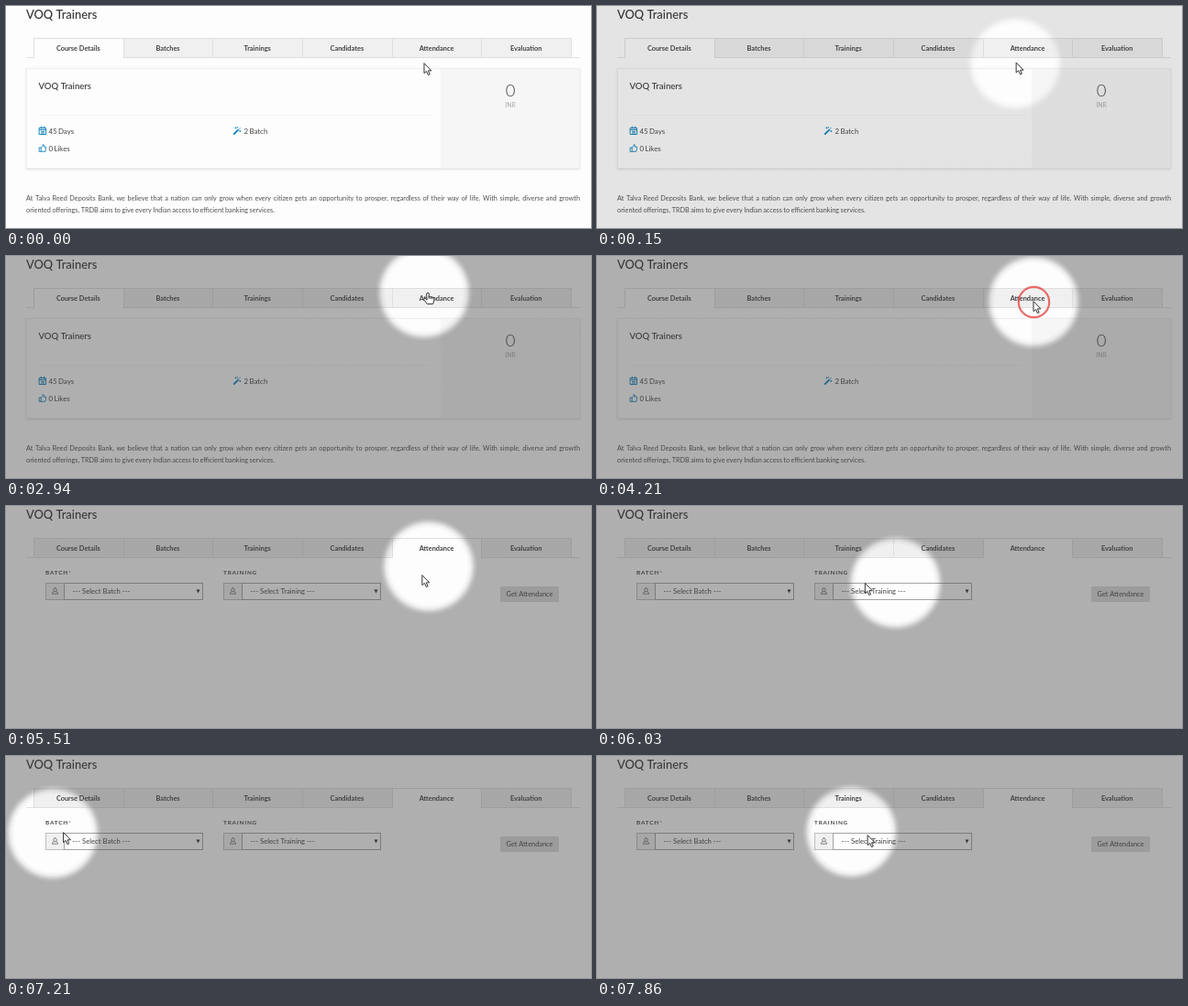
Recreate the animation shown at these times as an HTML page with a canvas. Size 638 by 243 pixels, loop 7990 ms.

```html
<!DOCTYPE html>
<html lang="en">
<head>
<meta charset="utf-8">
<title>Course attendance</title>
<style>
html, body { margin: 0; width: 100%; height: 100%; overflow: hidden; background: #fdfdfd; }
canvas { display: block; width: 638px; height: 243px; }
</style>
</head>
<body>
<canvas id="stage"></canvas>
<script>
const W = 638, H = 243, LOOP = 7990;
const SWITCH = 4580, CLICK = 4150, CLICK_END = 4440, LAG = 100;
const FONT = 'Lato, "Open Sans", sans-serif';
const BLUE = '#1585bd';
const TABS = ['Course Details', 'Batches', 'Trainings', 'Candidates', 'Attendance', 'Evaluation'];

// Pointer path: time, x, y
const PATH = [
  [0, 456, 63], [700, 470, 54], [1030, 477, 48], [1280, 469, 48],
  [1900, 448, 42], [2350, 442, 39], [2840, 456, 40], [2940, 460, 40],
  [3090, 467, 43], [3600, 490, 49], [4000, 476, 50], [5080, 476, 50],
  [5410, 461, 66], [5510, 454, 76], [6080, 279, 85], [6480, 196, 85],
  [6580, 167, 86], [6850, 46, 86], [7050, 48, 85], [7240, 67, 84],
  [7500, 165, 84], [7760, 277, 83], [7860, 295, 87], [7990, 304, 88]
];

const canvas = document.getElementById('stage');
const ctx = canvas.getContext('2d');
const dpr = window.devicePixelRatio || 1;
canvas.width = W * dpr;
canvas.height = H * dpr;

const clamp = v => Math.max(0, Math.min(1, v));

// Slope at a key; flat at turning points so the curve never overshoots
function slope(i, axis) {
  const a = PATH[i - 1], b = PATH[i], c = PATH[i + 1];
  if (!a || !c) return 0;
  const left = (b[axis] - a[axis]) / (b[0] - a[0]);
  const right = (c[axis] - b[axis]) / (c[0] - b[0]);
  return left * right <= 0 ? 0 : 2 * left * right / (left + right);
}

function pointer(t) {
  t = Math.max(0, t);
  let i = 0;
  while (i < PATH.length - 2 && t >= PATH[i + 1][0]) i++;
  const a = PATH[i], b = PATH[i + 1], span = b[0] - a[0];
  const u = clamp((t - a[0]) / span), v = 1 - u;
  return [1, 2].map(k =>
    a[k] * (1 + 2 * u) * v * v + b[k] * u * u * (3 - 2 * u) +
    span * u * v * (slope(i, k) * v - slope(i + 1, k) * u));
}

function text(str, x, y, size, { weight = 400, color = '#333', align = 'left', spacing = 0, gap = 0 } = {}) {
  ctx.font = `${weight} ${size}px ${FONT}`;
  ctx.fillStyle = color;
  ctx.textAlign = align;
  ctx.letterSpacing = spacing + 'px';
  ctx.wordSpacing = gap + 'px';
  ctx.fillText(str, x, y);
  ctx.letterSpacing = ctx.wordSpacing = '0px';
}

function justified(str, x, y, width, size, opts) {
  ctx.font = `400 ${size}px ${FONT}`;
  const gap = (width - ctx.measureText(str).width) / (str.split(' ').length - 1);
  text(str, x, y, size, { ...opts, gap });
}

function rect(x, y, w, h, fill, stroke) {
  if (fill) { ctx.fillStyle = fill; ctx.fillRect(x, y, w, h); }
  if (stroke) { ctx.strokeStyle = stroke; ctx.lineWidth = 1; ctx.strokeRect(x + .5, y + .5, w - 1, h - 1); }
}

function path(d, x, y, { fill, stroke, width = 1 }) {
  ctx.save();
  ctx.translate(x, y);
  const p = new Path2D(d);
  ctx.lineJoin = ctx.lineCap = 'round';
  ctx.lineWidth = width;
  if (fill) { ctx.fillStyle = fill; ctx.fill(p); }
  if (stroke) { ctx.strokeStyle = stroke; ctx.stroke(p); }
  ctx.restore();
}

function drawTabs(active) {
  const w = 586 / TABS.length;
  rect(22, 56, 604, 1, '#dfdfdf');
  TABS.forEach((name, i) => {
    const x = Math.round(30 + i * w), end = Math.round(30 + (i + 1) * w) + 1;
    const on = i === active;
    rect(x, 35, end - x, 22, on ? '#fdfdfd' : '#f0f0f0', '#dfdfdf');
    if (on) rect(x + 1, 56, end - x - 2, 1, '#fdfdfd');
  });
  TABS.forEach((name, i) =>
    text(name, 30 + (i + .5) * w, 48.5, 7.4, { weight: 700, color: '#404040', align: 'center' }));
}

function drawDetails() {
  ctx.save();
  ctx.shadowColor = 'rgba(0,0,0,.12)';
  ctx.shadowBlur = 2 * dpr;
  ctx.shadowOffsetY = dpr;
  rect(22, 68, 604, 110, '#fdfdfd');
  ctx.restore();
  rect(22, 68, 604, 110, null, '#eeeeee');
  rect(474, 69, 151, 108, '#f6f6f6');
  rect(36, 119, 427, 1, '#f3f3f3');
  text('VOQ Trainers', 35.5, 91, 9.6, { weight: 500 });
  text('0', 550, 99, 18.5, { weight: 300, color: '#444', align: 'center' });
  text('INR', 550, 111, 6.8, { color: '#aaa', align: 'center' });

  // Calendar, wand, thumb
  path('M.5 1.5H7.5V8.5H.5ZM.5 3.5H7.5M2.3 0V2M5.7 0V2M2.5 5.4H5.6M2.5 7H5.6', 36, 132, { stroke: BLUE });
  path('M.8 8L5.2 3.6', 248, 132, { stroke: BLUE, width: 1.8 });
  path('M6.4 2.4L7.2 1.6M2.5 .8V2M1.9 1.4H3.1M7.3 4.4V5.6M6.7 5H7.9M4.6 .4V1.2', 248, 132, { stroke: BLUE, width: .9 });
  path('M.5 4H2.2V8.3H.5ZM2.2 4.2L4 2.2L4.3 .5Q5.7 .5 5.3 3.2H7.5V5.2L6.8 8.3H2.2', 36, 151, { stroke: BLUE, width: .9 });
  const fact = { color: '#444', gap: -.7 };
  text('45 Days', 46.5, 139.5, 7.9, fact);
  text('0 Likes', 46.5, 158.5, 7.9, fact);
  text('2 Batch', 259.5, 139.5, 7.9, fact);

  const ink = { color: '#505050', gap: -.4 };
  justified('At Talva Reed Deposits Bank, we believe that a nation can only grow when every citizen gets an ' +
    'opportunity to prosper, regardless of their way of life. With simple, diverse and growth', 22, 213, 604, 7.3, ink);
  text('oriented offerings, TRDB aims to give every Indian access to efficient banking services.', 22, 226, 7.3, ink);
}

function drawField(x, label, hint) {
  text(label, x, 75, 6.4, { weight: 700, color: '#444', spacing: .8 });
  rect(x, 84, 21, 19, '#f0f0f0', '#bdbdbd');
  rect(x + 20, 84, 152, 19, '#fdfdfd', '#a4a4a4');
  path('M0 -3.2A1.8 2 0 0 1 0 .8A1.8 2 0 0 1 0 -3.2M-1 .6L-3 2V3.2H3V2L1 .6', x + 10.5, 93, { stroke: '#666', width: .8 });
  text(hint, x + 29.5, 96, 7.7, { color: '#444' });
  path('M-2 -2H2L0 2Z', x + 166.5, 93.5, { fill: '#333' });
}

function drawForm() {
  drawField(43, 'BATCH', '--- Select Batch ---');
  text('*', 68.5, 75, 5.5, { color: '#444' });
  drawField(237, 'TRAINING', '--- Select Training ---');
  ctx.fillStyle = '#dcdcdc';
  ctx.beginPath();
  ctx.roundRect(539, 88, 64, 17, 1.5);
  ctx.fill();
  text('Get Attendance', 571, 99, 7.4, { color: '#444', align: 'center' });
}

function drawSpotlight(t) {
  const [x, y] = pointer(t - LAG);
  const dim = .41 * clamp((t - 20) / 400);
  const shade = k => `rgba(64,64,64,${dim * k})`;
  const g = ctx.createRadialGradient(x, y, 42, x, y, 53.5);
  g.addColorStop(0, shade(0));
  g.addColorStop(.35, shade(.2));
  g.addColorStop(.75, shade(.8));
  g.addColorStop(1, shade(1));
  ctx.fillStyle = g;
  ctx.fillRect(0, 0, W, H);
}

function drawPointer(t) {
  const [x, y] = pointer(t);
  if (t >= CLICK && t < CLICK_END) {
    ctx.strokeStyle = 'rgba(232,72,72,.8)';
    ctx.lineWidth = 2.2;
    ctx.beginPath();
    ctx.arc(476.5, 50.5, 16.7, 0, Math.PI * 2);
    ctx.stroke();
  }
  const look = { fill: '#fff', stroke: '#333', width: 1 };
  if (t < CLICK && y > 35 && y < 56) {
    path('M-1.2 .8Q0 -.6 1.2 .8V4.6Q2.2 3.8 3.2 4.9Q4.2 4.2 5 5.3Q6.6 4.8 6.8 6.4V8.6L5.6 12.5H-.6L-4.4 7.8Q-4.6 6 -2.8 6.5L-1.2 8Z' +
      'M1.2 4.6V6.4M3.2 4.9V6.6M5 5.3V6.8', x, y, look);
  } else {
    path('M0 0V10.6L2.5 8.4L4.4 12.6L6.2 11.8L4.4 7.8H7.6Z', x, y, look);
  }
}

function draw(t) {
  const open = t >= SWITCH;
  ctx.setTransform(dpr, 0, 0, dpr, 0, 0);
  rect(0, 0, W, H, '#fdfdfd');
  text('VOQ Trainers', 22, 14, 12.9, { weight: 500 });
  drawTabs(open ? 4 : 0);
  open ? drawForm() : drawDetails();
  drawSpotlight(t);
  drawPointer(t);
}

const start = performance.now();
function tick() {
  draw((performance.now() - start) % LOOP);
  requestAnimationFrame(tick);
}
tick();
</script>
</body>
</html>
```
